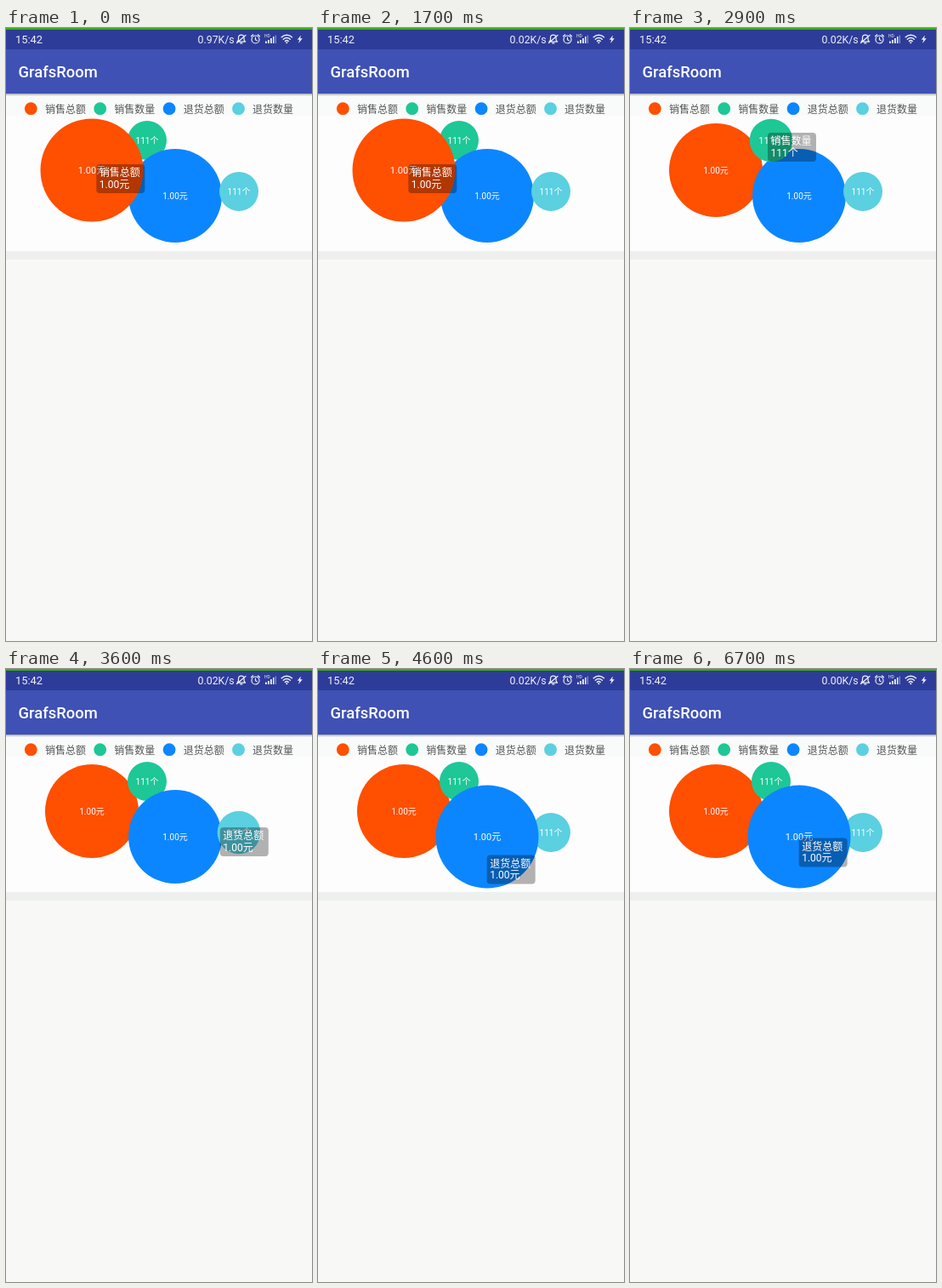
Recreate the animation shown at these times as an HTML page. Size 360 by 720 pixels, loop 6.8 s.

```html
<!DOCTYPE html>
<html lang="zh-CN">
<head>
<meta charset="utf-8">
<title>GrafsRoom</title>
<style>
html, body { margin: 0; width: 100%; height: 100%; overflow: hidden; background: #f8f9f6; }
svg { display: block; width: 360px; height: 720px; }
text { font-family: Roboto, "Noto Sans CJK SC", "Noto Sans CJK", sans-serif; }
.label { font-size: 10px; fill: #fff; text-anchor: middle; }
.tip { font-size: 12px; fill: #fff; }
.legend { font-size: 12px; fill: #555; }
.icon { fill: none; stroke: #eef0f8; stroke-width: 1.2; stroke-linecap: round; stroke-linejoin: round; }
.solid { fill: #eef0f8; }
</style>
</head>
<body>
<svg viewBox="0 0 360 720">
  <defs>
    <linearGradient id="shade" x1="0" y1="0" x2="0" y2="1">
      <stop offset="0" stop-color="#666" stop-opacity=".55"/>
      <stop offset="1" stop-color="#666" stop-opacity="0"/>
    </linearGradient>
  </defs>
  <rect width="360" height="720" fill="#f8f9f6"/>
  <rect y="77" width="360" height="26" fill="#f9fafa"/>
  <rect y="103" width="360" height="159" fill="#fdfdfd"/>
  <rect y="262" width="360" height="10" fill="#edf0ee"/>
  <rect width="360" height="25" fill="#2e3c99"/>
  <rect width="360" height="2" fill="#39b00c"/>
  <rect y="25" width="360" height="52" fill="#3f51b5"/>
  <rect y="77" width="360" height="3" fill="url(#shade)"/>
  <text x="14.5" y="58.3" font-size="18.4" font-weight="500" fill="#fff">GrafsRoom</text>
  <text x="11" y="18" font-size="12.9" fill="#eef0f8">15:42</text>
  <text id="speed" x="268.7" y="17.8" font-size="12.3" fill="#eef0f8" text-anchor="end"></text>

  <g class="icon">
    <path d="M272 16.2h9.5l-1.4-2V11.5a3.3 3.3 0 0 0-6.6 0V14.2zM275.7 17.9h2.2M271.5 17.5l10.5-9"/>
    <circle cx="293.5" cy="13.5" r="4.5"/>
    <path d="M293.5 11v2.8l1.8 1M288.5 9.8l2.2-2M298.5 9.8l-2.2-2"/>
    <path d="M324.2 10.8a8.8 8.8 0 0 1 12.2 0M326.3 13.2a5.8 5.8 0 0 1 8 0M328.4 15.5a2.7 2.7 0 0 1 3.8 0" stroke-width="1.5"/>
  </g>
  <g class="solid">
    <circle cx="330.3" cy="17.3" r="1"/>
    <path d="M347 8.5l-4.2 5.3h2.5l-1.3 4.2 4.8-5.8h-2.7z"/>
    <path d="M305 15.5h1.8V18H305zM308 14h1.8v4H308zM311 12h1.8v6H311zM314 10h1.5v8H314z"/>
    <path d="M316.7 8.5h1.3V18h-1.3z" opacity=".45"/>
    <text x="304" y="11" font-size="5">HD</text>
  </g>

  <g id="legend"></g>
  <g id="bubbles"></g>
  <g id="tip">
    <rect width="57" height="34" rx="4" fill="#000" fill-opacity=".3"/>
    <text class="tip" x="3.5" y="14"></text>
    <text class="tip" x="3.5" y="27.7"></text>
  </g>
</svg>
<script>
const LOOP = 6800, STEP = 100, SPRING = 400;
const $ = id => document.getElementById(id);

function add(parent, tag, attrs, text = '') {
  const el = document.createElementNS('http://www.w3.org/2000/svg', tag);
  for (const key in attrs) el.setAttribute(key, attrs[key]);
  el.textContent = text;
  return parent.appendChild(el);
}

const items = [
  { name: '销售总额', value: '1.00元', color: '#ff4f00', x: 101, y: 167, r: 55 },
  { name: '销售数量', value: '111个', color: '#1ec796', x: 166, y: 132, r: 23 },
  { name: '退货总额', value: '1.00元', color: '#0c86ff', x: 199, y: 197, r: 55 },
  { name: '退货数量', value: '111个', color: '#5ad0e0', x: 274, y: 192, r: 23 }
];

items.forEach((it, i) => {
  const x = 29.3 + i * 81.4;
  add($('legend'), 'circle', { cx: x, cy: 94.7, r: 7.4, fill: it.color });
  add($('legend'), 'text', { x: x + 16.6, y: 99.6, class: 'legend' }, it.name);
  it.el = add($('bubbles'), 'g', {});
  add(it.el, 'circle', { r: it.r, fill: it.color });
  add(it.el, 'text', { y: 3.8, class: 'label' }, it.value);
});

// [time, highlighted item]
const picks = [[-1000, 0], [1850, 2], [2550, 1], [3050, 3], [3650, 2]];

// Tooltip moves: [start, end, x, y, item]
const moves = [
  [-2, -1, 106.3, 160, 0],
  [1850, 2250, 216, 190, 2],
  [2550, 2900, 162, 123, 1],
  [3050, 3450, 284, 185, 3],
  [3550, 3900, 197, 188, 2],
  [3900, 4400, 198, 226, 2],
  [4400, 4600, 198.7, 218.5, 2],
  [4600, 5000, 198.7, 198.5, 2]
];

const clamp = k => Math.min(1, Math.max(0, k));
const easeOut = k => 1 - (1 - k) ** 3;
const elastic = k => k <= 0 ? 0 : k >= 1 ? 1
  : 1 + 2 ** (-10 * k) * Math.sin((k - 0.1) * 5 * Math.PI);

function drawBubbles(t) {
  const n = picks.filter(p => p[0] <= t).length - 1;
  const [start, active] = picks[n];
  const last = n > 0 ? picks[n - 1][1] : -1;
  const e = elastic((t - start) / SPRING);
  items.forEach((it, i) => {
    const lift = i === active ? e : i === last ? 1 - e : 0;
    it.el.setAttribute('transform', `translate(${it.x} ${it.y}) scale(${1 + 0.1 * lift})`);
    $('bubbles').appendChild(it.el);
  });
  $('bubbles').appendChild(items[active].el);
}

function drawTip(t) {
  let x = 0, y = 0, item = items[0];
  for (const [from, to, tx, ty, i] of moves) {
    if (t < from) break;
    const k = easeOut(clamp((t - from) / (to - from)));
    x += (tx - x) * k;
    y += (ty - y) * k;
    item = items[i];
  }
  const [title, value] = $('tip').querySelectorAll('text');
  $('tip').setAttribute('transform', `translate(${x} ${y})`);
  title.textContent = item.name;
  value.textContent = item.value;
}

function draw(t) {
  drawBubbles(t);
  drawTip(t);
  $('speed').textContent = (t < 1700 ? '0.97' : t < 5700 ? '0.02' : '0.00') + 'K/s';
}

function tick() {
  const t = performance.now() % LOOP;
  draw(Math.floor(t / STEP) * STEP);
  requestAnimationFrame(tick);
}
tick();
</script>
</body>
</html>
```
